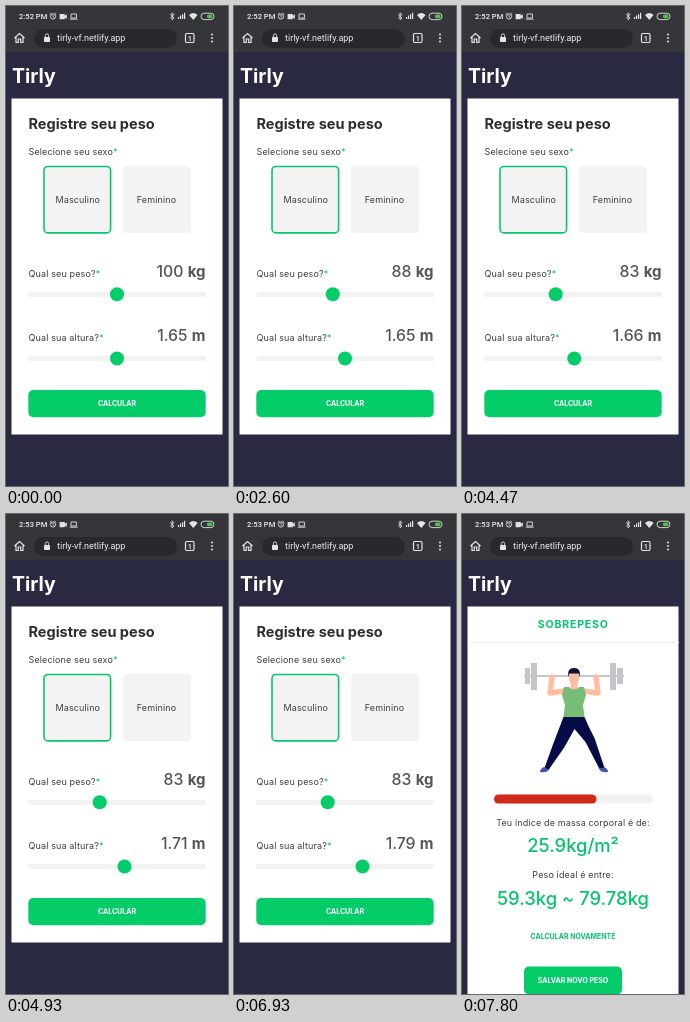
Write an HTML page that moves like this. It is 222x480 px and loops after 8 s.

```html
<!DOCTYPE html>
<html lang="pt">
<head>
<meta charset="utf-8">
<title>Tirly</title>
<style>
  html, body { margin: 0; height: 100%; overflow: hidden; background: #2a2942; }
  svg { display: block; width: 100vw; height: 100vh; }
  text { font: 9px Inter, sans-serif; letter-spacing: .015em; fill: #3e3e3e; }
  .roboto { font-family: Roboto, sans-serif; letter-spacing: 0; fill: #eee; }
  .mid { text-anchor: middle; }
  .end { text-anchor: end; font-size: 15.8px; font-weight: 500; letter-spacing: 0; fill: #555; }
  .unit { font-size: 15px; font-weight: 700; }
  .button { font-size: 7px; font-weight: 700; letter-spacing: 0; fill: #fff; text-anchor: middle; }
  .big { font-size: 18.4px; font-weight: 500; letter-spacing: 0; text-anchor: middle; }
  .green, .big { fill: #06c46d; }
  .card { fill: #fff; }
  .track { fill: #f2f2f2; }
  .go { fill: #04cc69; }
  .line { fill: none; stroke: #e4e4e4; }
</style>
</head>
<body>
<svg viewBox="0 0 222 480" preserveAspectRatio="none">
  <rect width="222" height="480" fill="#2a2942"/>
  <rect width="222" height="46" fill="#35363a"/>

  <!-- Status bar -->
  <text id="clock" class="roboto" x="13" y="13" style="font-size:7.6px;font-weight:500"></text>
  <g class="line" stroke-width=".9">
    <circle cx="47" cy="10.5" r="2.6"/>
    <path d="M47 9v1.7l1.2.7M43.8 8.4l1.7-1.4M50.2 8.4 48.5 7"/>
    <path d="M65 8h5.4v4H65zM63.8 13.2h7.8"/>
    <path d="m164.3 8.3 3.6 3.8-1.8 1.8V6.8l1.8 1.8-3.6 3.7"/>
    <rect x="195" y="7.2" width="13" height="6.4" rx="3.2"/>
  </g>
  <path d="M53.6 8h5.2v1.8l2-1.5v4.6l-2-1.5v1.9h-5.2z" fill="#e4e4e4"/>
  <path d="M172 13v-2h1.2v2zm2 0V9.6h1.2V13zm2 0V8.2h1.2V13zm2 0V6.8h1.2V13zM183 8.9q4.3-3.6 8.6 0L187.3 14z" fill="#e4e4e4"/>
  <rect x="201" y="8.5" width="5.5" height="3.8" rx="1.8" fill="#54c253"/>

  <!-- Browser toolbar -->
  <rect x="28" y="23" width="143" height="19" rx="9.5" fill="#28292d"/>
  <path class="line" d="M8.5 32 13.5 27.5 18.5 32M10 31v5.5h2.3V33h2.4v3.5H17V31" stroke-width="1.2"/>
  <rect x="38" y="31" width="6" height="5" rx=".8" fill="#e4e4e4"/>
  <path class="line" d="M39.4 31v-1.5a1.6 1.6 0 0 1 3.2 0V31" stroke-width=".9"/>
  <text class="roboto" x="51" y="35">tirly-vf.netlify.app</text>
  <rect class="line" x="179.5" y="27.5" width="8.5" height="9" rx="1.2" stroke-width="1.2"/>
  <text class="roboto mid" x="183.8" y="34.5" style="font-size:6.5px;font-weight:700">1</text>
  <g fill="#e4e4e4"><circle cx="206" cy="28.5" r="1"/><circle cx="206" cy="32" r="1"/><circle cx="206" cy="35.5" r="1"/></g>

  <text x="6" y="77" style="font-size:19.5px;font-weight:700;letter-spacing:0;fill:#fff">Tirly</text>

  <g id="form">
    <rect class="card" x="5.5" y="92.5" width="211" height="336"/>
    <text x="22.5" y="123" style="font-size:14.5px;font-weight:700;letter-spacing:0;fill:#2d2d2d">Registre seu peso</text>
    <text x="22.5" y="149">Selecione seu sexo<tspan class="green">*</tspan></text>
    <rect x="38" y="160.5" width="66.6" height="66.4" rx="4" fill="#f3f3f3" stroke="#04c76b" stroke-width="1.6"/>
    <rect x="117" y="160" width="68" height="67" rx="4" fill="#f3f3f3"/>
    <text class="mid" x="71.8" y="197">Masculino</text>
    <text class="mid" x="150.5" y="197">Feminino</text>

    <text x="22.5" y="271">Qual seu peso?<tspan class="green">*</tspan></text>
    <text class="end" x="199.5" y="271"><tspan id="weight"></tspan> <tspan class="unit">kg</tspan></text>
    <rect class="track" x="22.5" y="286" width="177" height="5"/>
    <circle id="weightThumb" class="go" cy="288.3" r="7"/>

    <text x="22.5" y="335">Qual sua altura?<tspan class="green">*</tspan></text>
    <text class="end" x="199.5" y="335"><tspan id="height"></tspan> <tspan class="unit">m</tspan></text>
    <rect class="track" x="22.5" y="350" width="177" height="5"/>
    <circle id="heightThumb" class="go" cy="352.5" r="7"/>

    <rect id="submit" class="go" x="22.3" y="384" width="177.4" height="27.3" rx="5"/>
    <text id="submitLabel" class="button" x="111" y="400.3">CALCULAR</text>
  </g>

  <g id="result">
    <rect class="card" x="5.5" y="92.5" width="211" height="400"/>
    <text class="mid green" x="111.3" y="114" style="font-size:10.5px;font-weight:700;letter-spacing:.08em">SOBREPESO</text>
    <path d="M6 128.5h211" stroke="#f0f0f0"/>

    <!-- Weightlifter -->
    <path d="M62 162h100" stroke="#c9c6c7" stroke-width="1.8"/>
    <path d="M63 154h5v16h-5zm6-5h6v27h-6zm79 0h6v27h-6zm7 5h6v16h-6z" fill="#c3c5c8"/>
    <g fill="none" stroke="#ffbea0" stroke-linejoin="round" stroke-linecap="round">
      <path d="M103 177 88 179 90 163M121 177l15 2-2-16" stroke-width="5.5"/>
      <path d="M112 168v6" stroke-width="7"/>
    </g>
    <ellipse cx="112" cy="164" rx="5" ry="7" fill="#ffbea0"/>
    <path d="M106.500 163q-2-9 5.500-9t5.500 9l-1-3.500h-9z" fill="#0b1038"/>
    <path d="M102 173h5q5 5 10 0h5l2 8-3 10 1.500 12h-21l1.500-12-3-10z" fill="#77bd78"/>
    <path d="M101.500 203h21q4 10 10 21l10 30-5 1-14-27-11-13-10 18-16 23-4-2 9-25q5-13 10-26z" fill="#050b46"/>
    <path d="m82 253 5 3q-3 3-9 2 0-3 4-5zm60 0-5 3q4 3 9 2 0-3-4-5z" fill="#4650b4"/>

    <rect class="track" x="32" y="280.5" width="158.500" height="9" rx="4.5"/>
    <rect x="32" y="280.5" width="102.5" height="9" rx="4.5" fill="#d02a1b"/>
    <text class="mid" x="111" y="312">Teu índice de massa corporal é de:</text>
    <text class="big" x="111" y="338">25.9kg/m²</text>
    <text class="mid" x="111" y="364">Peso ideal é entre:</text>
    <text class="big" x="111" y="391">59.3kg ~ 79.78kg</text>
    <text class="button" x="111" y="425" style="fill:#06c46d">CALCULAR NOVAMENTE</text>
    <rect class="go" x="62" y="452.5" width="98" height="28" rx="5"/>
    <text class="button" x="111" y="469">SALVAR NOVO PESO</text>
  </g>
</svg>
<script>
const LOOP = 8000, RESULT_AT = 7600;
const $ = id => document.getElementById(id);

// [time in ms, value]: values glide between neighbouring keys.
const weightKeys = [[2070, 100], [2930, 80], [3329, 80], [3330, 82], [3399, 82], [3400, 83]];
const heightKeys = [[4329, 165], [4330, 166], [4470, 166], [4930, 171], [5070, 171],
  [5530, 174], [5670, 174], [6000, 177], [6330, 179]];

function valueAt(keys, t) {
  const next = keys.findIndex(key => key[0] > t);
  if (next === 0) return keys[0][1];
  if (next < 0) return keys[keys.length - 1][1];
  const [t0, a] = keys[next - 1], [t1, b] = keys[next];
  return Math.round(a + (b - a) * (t - t0) / (t1 - t0));
}

const thumbX = (value, min, max) => 29.5 + 163 * (value - min) / (max - min);

function draw(t) {
  const weight = valueAt(weightKeys, t), height = valueAt(heightKeys, t);
  $('clock').textContent = t < 4670 ? '2:52 PM' : '2:53 PM';
  $('weight').textContent = weight;
  $('weightThumb').setAttribute('cx', thumbX(weight, 20, 180));
  $('height').textContent = (height / 100).toFixed(2);
  $('heightThumb').setAttribute('cx', thumbX(height, 100, 230));

  const press = Math.min(1, Math.max(0, (t - 7300) / 100));
  $('submit').style.fill = `rgb(${4 + 14 * press}, ${204 - 12 * press}, ${105 + 28 * press})`;
  $('submitLabel').style.opacity = 1 - 0.25 * press;

  const done = t >= RESULT_AT;
  $('form').style.display = done ? 'none' : '';
  $('result').style.display = done ? '' : 'none';
}

const start = performance.now();
function tick() {
  draw((performance.now() - start) % LOOP);
  requestAnimationFrame(tick);
}
tick();
</script>
</body>
</html>
```
